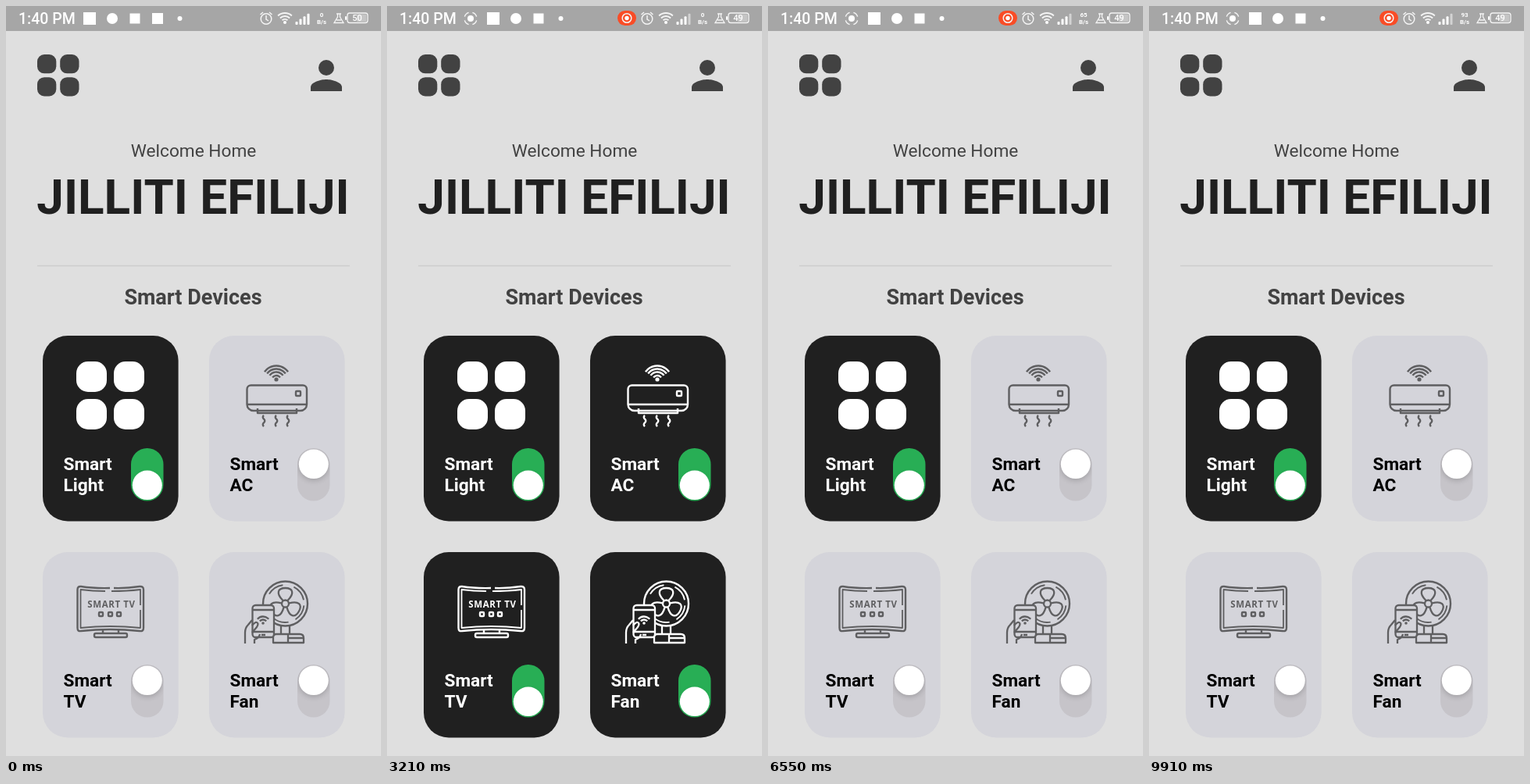
Recreate the animation shown at these times as an HTML page with a canvas. Size 480 px wide and 960 px high, loop 9.94 s.

```html
<!DOCTYPE html>
<html lang="en">
<head>
<meta charset="utf-8">
<title>Smart Home</title>
<style>
html, body { margin: 0; width: 100%; height: 100%; overflow: hidden; background: #dfdfdf; }
canvas { display: block; width: 480px; height: 960px; }
</style>
</head>
<body>
<canvas id="stage" width="480" height="960"></canvas>
<script>
const ctx = document.getElementById('stage').getContext('2d');
const LOOP = 9940, SLIDE = 180, STRETCH = 7.5;
const DARK = '#202020', GREY = '#424242', GREEN = [40, 174, 85], TRACK = [198, 196, 201];

const devices = [
  { name: 'Light', x: 47, y: 422, icon: drawTiles, on: 1 },
  { name: 'AC', x: 260, y: 422, icon: drawAC, on: 0 },
  { name: 'TV', x: 47, y: 699, icon: drawTV, on: 0 },
  { name: 'Fan', x: 260, y: 699, icon: drawFan, on: 0 }
];

// The card changes colour at `flip`, after the knob has slid.
const taps = [
  { device: 1, to: 1, slide: 900, flip: 1090 },
  { device: 2, to: 1, slide: 2000, flip: 2190 },
  { device: 3, to: 1, slide: 2870, flip: 3205 },
  { device: 3, to: 0, slide: 3735, flip: 3920 },
  { device: 2, to: 0, slide: 4930, flip: 5112 },
  { device: 1, to: 0, slide: 5900, flip: 6090 },
  { device: 0, to: 0, slide: 7480, flip: 7670 },
  { device: 0, to: 1, slide: 8630, flip: 8875 }
];

const clamp = v => Math.max(0, Math.min(1, v));
const ease = v => v * v * (3 - 2 * v);
const mix = (a, b, k) => `rgb(${a.map((v, i) => Math.round(v + (b[i] - v) * k))})`;

function box(x, y, w, h, r) {
  ctx.beginPath();
  ctx.roundRect(x, y, w, h, r);
}
function fillBox(x, y, w, h, r, color) {
  if (color) ctx.fillStyle = color;
  box(x, y, w, h, r);
  ctx.fill();
}
function lineBox(x, y, w, h, r) {
  box(x, y, w, h, r);
  ctx.stroke();
}
function disc(x, y, r) {
  ctx.beginPath();
  ctx.arc(x, y, r, 0, 7);
  ctx.fill();
}
function arc(x, y, r, from = 0, to = Math.PI * 2) {
  ctx.beginPath();
  ctx.arc(x, y, r, from, to);
  ctx.stroke();
}
function path(d) {
  ctx.stroke(new Path2D(d));
}
function text(s, x, y, font, color, align = 'left') {
  ctx.font = font + ', sans-serif';
  ctx.textAlign = align;
  if (color) ctx.fillStyle = color;
  ctx.fillText(s, x, y);
}
function waves(x, y, radii, spread) {
  for (const r of radii) arc(x, y, r, -Math.PI / 2 - spread, -Math.PI / 2 + spread);
}

function tiles(x, y, size, step, r) {
  for (let i = 0; i < 4; i++) fillBox(x + (i % 2) * step, y + (i >> 1) * step, size, size, r);
}

function drawTiles() {
  tiles(43, 33, 39, 48, 15);
}

function drawAC() {
  disc(86, 56, 2.6);
  waves(86, 57, [6, 10.5, 14.5, 18.5], 0.95);
  lineBox(48.5, 63.5, 76.5, 32.5, [5, 5, 8, 8]);
  path('M49 88H125');
  lineBox(111, 71, 6, 6, 1);
  path('M62 93V99H112V93');
  for (const x of [70, 86, 101]) path(`M${x} 102q-2.500 2.300 0 4.700t0 4.700t0 4.700`);
}

function drawTV() {
  path('M86 46Q65 46.500 49 44Q44.500 43.500 44.500 48V97Q44.500 102 49 101Q86 97 124 101Q129 102 129 97V48Q129 43.500 124 44Q108 46.500 91 46');
  ctx.lineWidth = 1.8;
  path('M80 50Q64 50 48.500 48V97Q86 93 125 97V74M125 68V48Q108 50 88 50');
  ctx.lineWidth = 2.4;
  path('M77 99V104M97 99V104');
  lineBox(66, 104, 42, 5, 2);
  ctx.letterSpacing = '0.6px';
  text('SMART TV', 88, 71, 'bold 11.5px "Noto Sans"', null, 'center');
  ctx.letterSpacing = '0px';
  for (const x of [72, 84, 95]) lineBox(x, 77, 5, 5, 1);
}

function drawFan(cardColor) {
  const cx = 97.5, cy = 66;
  arc(cx, cy, 28.5);
  ctx.lineWidth = 1.9;
  for (const a of [-2.6, -1.1, 0.1, 1.4]) arc(cx, cy, 24, a, a + 0.9);
  ctx.lineWidth = 2.3;
  arc(cx, cy, 4.5);
  for (let i = 0; i < 3; i++) {
    ctx.save();
    ctx.translate(cx, cy);
    ctx.rotate(i * Math.PI * 2 / 3);
    path('M-3 -4C-12 -13 -10 -20 0 -20S12 -13 3 -4');
    ctx.restore();
  }
  path('M92 95V105M103 95V105M82 116V109Q82 105 86 105H116Q121 105 121 110V116ZM101 105V116M102 110H120');
  ctx.fillStyle = cardColor;
  box(55.5, 68, 27.5, 41, 4);
  ctx.fill();
  ctx.stroke();
  path('M56 74H83M56 102H83M67 106H72');
  ctx.fillStyle = ctx.strokeStyle;
  disc(69, 91, 1.8);
  waves(69, 92, [5.5, 9.5], 0.85);
  path('M46 117V103Q46 97 50 93L55 87M55 103L61 96Q64 91 61 90Q59 89 55 94M58 117V112Q64 110 65 105');
}

function switchState(index, t) {
  let on = devices[index].on, pos = on, press = 0;
  for (const tap of taps) {
    if (tap.device !== index || t < tap.slide - 60) continue;
    const k = ease(clamp((t - tap.slide) / SLIDE));
    pos = tap.to ? k : 1 - k;
    press = Math.min(
      clamp((t - tap.slide + 60) / 110),
      1 - clamp((t - tap.slide - SLIDE - 40) / 100)
    );
    if (t >= tap.flip) on = tap.to;
  }
  return { on, pos, press };
}

function drawSwitch({ pos, press }) {
  const x = 113, y = 144, w = 41.5, h = 67.5;
  const extra = STRETCH * press;
  fillBox(x, y, w, h, w / 2, mix(TRACK, GREEN, pos));
  ctx.save();
  box(x, y, w, h, w / 2);
  ctx.clip();
  ctx.shadowColor = `rgba(0,0,0,${0.2 - 0.14 * pos})`;
  ctx.shadowBlur = 7;
  ctx.shadowOffsetY = 2;
  fillBox(x + 1.8, y + 1.6 + pos * (27 - extra), 38, 37.5 + extra, 19, '#fff');
  ctx.restore();
}

function drawCard(device, state) {
  const color = state.on ? DARK : '#d4d4da';
  const ink = state.on ? '#fff' : '#5f5f61';
  const label = state.on ? '#fff' : '#000';
  ctx.save();
  ctx.translate(device.x, device.y);
  fillBox(0, 0, 173.6, 237.5, 32, color);
  ctx.save();
  ctx.fillStyle = ctx.strokeStyle = ink;
  ctx.lineWidth = 2.4;
  ctx.lineJoin = 'round';
  device.icon(color);
  ctx.restore();
  text('Smart', 26.5, 172, 'bold 22.67px Roboto', label);
  text(device.name, 26.5, 199, 'bold 22.67px Roboto', label);
  drawSwitch(state);
  ctx.restore();
}

function drawStatusBar(t) {
  const recording = t >= 120;
  const speed = t < 3400 ? '0' : t < 7500 ? '65' : '93';
  ctx.fillStyle = '#a6a6a6';
  ctx.fillRect(0, 0, 480, 32);
  text('1:40 PM', 16, 23, '500 19.5px Roboto', '#fff');
  ctx.strokeStyle = '#f4f4f4';
  ctx.lineWidth = 1.5;

  // Notifications
  let x = 107;
  if (recording) {
    for (let i = 0; i < 4; i++) arc(x, 16, 8, i * Math.PI / 2 + 0.3, i * Math.PI / 2 + 1.27);
    disc(x, 16, 4);
    x += 29;
  }
  fillBox(x - 8, 8, 16, 16, 0);
  disc(x + 29, 16, 7);
  fillBox(x + 51.5, 9.5, 13, 13, 0);
  if (!recording) fillBox(x + 80, 9, 14, 14, 0);
  disc(222.5, 16, 3);

  if (recording) {
    fillBox(295, 6, 24, 19, 9.5, '#f94c26');
    arc(307, 15.5, 5.8);
    ctx.fillStyle = '#fff';
    disc(307, 15.5, 2.7);
  }

  // Alarm, wifi and signal
  arc(333, 16.5, 6.8);
  path('M333 12V17L336 19M325.5 11L329 8M340.500 11L337 8');
  ctx.lineWidth = 2;
  waves(357, 22, [5, 9, 13], 0.75);
  disc(357, 21, 2);
  for (let i = 0; i < 4; i++) {
    ctx.globalAlpha = i === 3 && recording ? 0.5 : 1;
    fillBox(370.5 + i * 5, 20 - i * 3.4, 3, 4 + i * 3.4, 1);
  }
  ctx.globalAlpha = 1;

  text(speed, 404, 14, 'bold 8px Roboto', '#fff', 'center');
  text('B/s', 404, 23, 'bold 8px Roboto', '#fff', 'center');

  // Flask and battery
  ctx.lineWidth = 1.3;
  path('M423 10H429M424.500 10V14L420 21.500H432L427.500 14V10M423 18H429');
  fillBox(434, 13, 2, 5, 1);
  lineBox(437, 9, 26, 12.5, 3);
  ctx.globalAlpha = 0.35;
  fillBox(449, 10.5, 12.5, 9.5, 1);
  ctx.globalAlpha = 1;
  text(recording ? '49' : '50', 449.5, 19.3, '500 11px Roboto', '#fff', 'center');
}

function drawHeader() {
  ctx.fillStyle = GREY;
  tiles(40, 62, 24.3, 29.2, 9);
  disc(410, 79, 10);
  ctx.fill(new Path2D('M410 94C403.3 94 390 97.3 390 104V109H430V104C430 97.3 416.7 94 410 94Z'));
  text('Welcome Home', 240, 193, '22.67px Roboto', GREY, 'center');
  text('JILLITI EFILIJI', 239.5, 266, 'bold 62px Roboto', DARK, 'center');
  ctx.fillStyle = '#cdcdcd';
  ctx.fillRect(40, 331.8, 400, 1.5);
  text('Smart Devices', 239.5, 382, 'bold 27px Roboto', GREY, 'center');
}

function draw(t) {
  ctx.fillStyle = '#dfdfdf';
  ctx.fillRect(0, 0, 480, 960);
  drawStatusBar(t);
  drawHeader();
  devices.forEach((device, i) => drawCard(device, switchState(i, t)));
}

const start = performance.now();
function frame(now) {
  draw(Math.max(0, now - start) % LOOP);
  requestAnimationFrame(frame);
}
requestAnimationFrame(frame);
</script>
</body>
</html>
```
